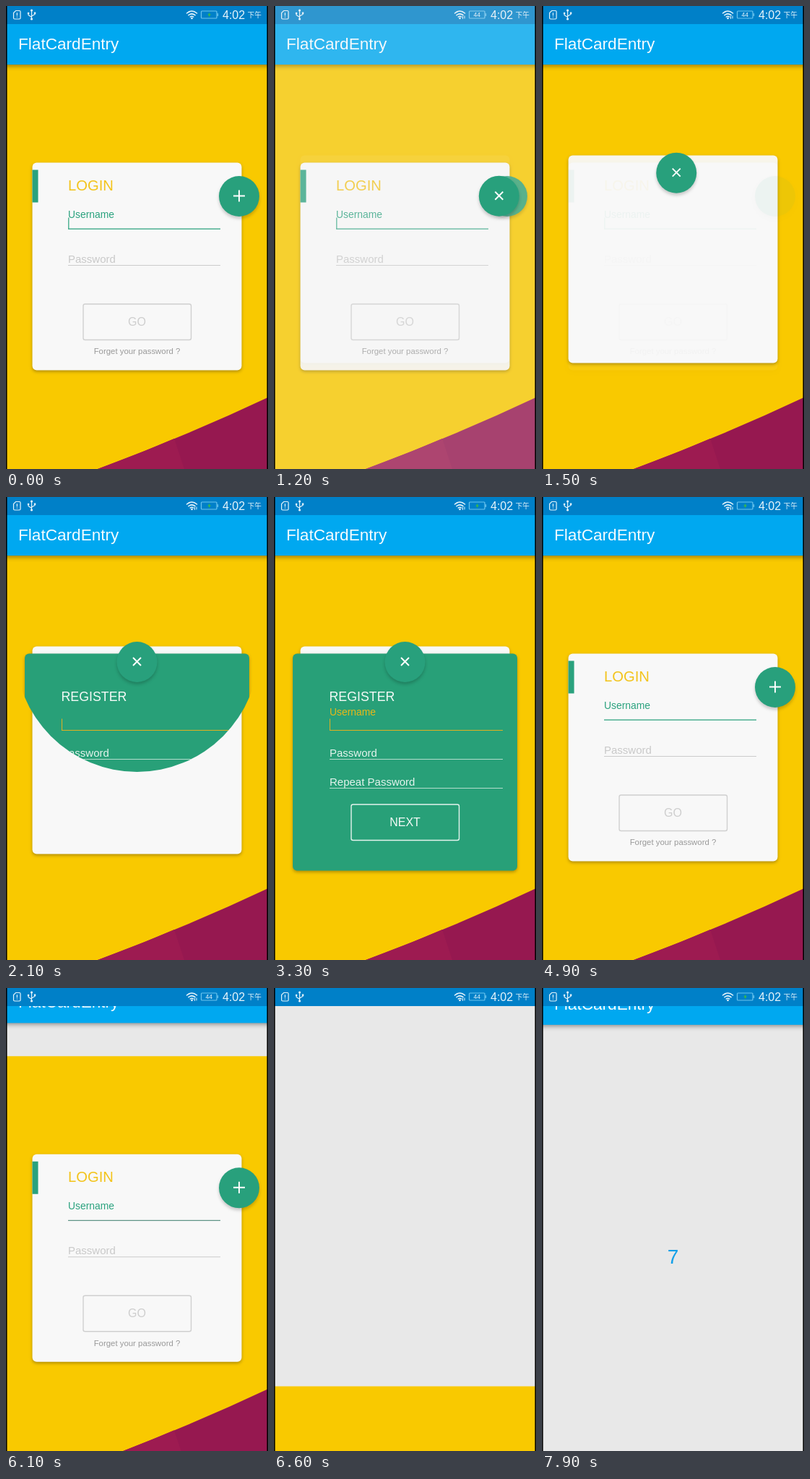
An HTML page that plays this animation: 363 px wide and 640 px high, repeating every 8000 ms.

```html
<!DOCTYPE html>
<html lang="en">
<head>
<meta charset="utf-8">
<title>Login card</title>
<style>
  html, body { margin: 0; width: 100%; height: 100%; overflow: hidden; background: #e8e8e8; }
  svg { display: block; width: 363px; height: 640px; }
  text { font-family: "Liberation Sans", Arial, sans-serif; white-space: pre; }
  .mid { text-anchor: middle; }
  .card { filter: drop-shadow(0 2px 2px rgba(70, 50, 0, .4)); }
  .fab { filter: drop-shadow(0 3px 2px rgba(0, 0, 0, .2)); }
  .bar { filter: drop-shadow(0 2px 3px rgba(0, 0, 0, .4)); }
</style>
</head>
<body>
<svg viewBox="0 0 363 640">
  <defs>
    <clipPath id="reveal"><circle id="hole" cx="181.5" cy="211" r="28"/></clipPath>
    <g id="paper">
      <rect y="81" width="363" height="640" fill="#f9c900"/>
      <path d="M92 653 L127 640 Q248 595 363 541 V721 H92Z" fill="#961850"/>
      <path d="M92 653 L127 640 Q182 620 233 598 L247 640 L270 721 H92Z" fill="#9d1b51"/>
    </g>
    <g id="disc"><circle r="28" fill="#28a07c"/></g>
  </defs>

  <rect width="363" height="640" fill="#e8e8e8"/>

  <g id="page">
    <use href="#paper"/>
    <rect class="card" x="36.5" y="216.5" width="290" height="287" rx="6" fill="#f8f8f8"/>
    <rect x="36.5" y="226.5" width="8" height="45" fill="#2aa27e"/>
    <text x="86" y="255.2" font-size="20.2" fill="#f3c41c">LOGIN</text>
    <text x="86" y="293" font-size="13.9" fill="#2aa27e">Username</text>
    <path id="focus" d="M86 308.2H297" stroke="#2aa27e" stroke-width="1.3"/>
    <path id="caret" d="M86.8 292.5V308" stroke="#2aa27e" stroke-width="1.2"/>
    <text x="86" y="355" font-size="15" fill="#c9c9c9">Password</text>
    <path d="M86 358.5H297" stroke="#cbcbcb"/>
    <rect x="107" y="412" width="149.5" height="49.5" rx="2.5" fill="none" stroke="#d0d0d0" stroke-width="1.4"/>
    <text class="mid" x="181.5" y="442" font-size="16" fill="#cecece">GO</text>
    <text class="mid" x="181.5" y="481.3" font-size="11.4" fill="#999">Forget your password ?</text>
    <g id="oldFab" class="fab" transform="translate(323 263)"><use href="#disc"/></g>
  </g>

  <g id="next">
    <use href="#paper"/>
    <rect class="card" x="36.5" y="206.5" width="290" height="287" rx="6" fill="#f8f8f8"/>
  </g>

  <text id="count" class="mid" x="181.5" font-size="28" fill="#14a0e8">7</text>

  <g id="header">
    <rect class="bar" x="-8" y="0" width="379" height="81" fill="#00a8f0"/>
    <text x="17" y="60" font-size="22.6" fill="#f4fbff">FlatCardEntry</text>
  </g>

  <g id="form" clip-path="url(#reveal)">
    <rect class="card" x="26" y="216.5" width="311" height="300" rx="6" fill="#28a078"/>
    <text x="76.5" y="282" font-size="17.8" fill="#f4faf7">REGISTER</text>
    <text id="hint" x="77" y="302" font-size="13.9" fill="#e8b818">Username</text>
    <path d="M77 322.5H317" stroke="#e0b020"/>
    <path id="caret2" d="M77.5 306.5V322" stroke="#e0b020"/>
    <g font-size="15" fill="#e4f3ed">
      <text x="77" y="358.5">Password</text>
      <text x="77" y="398.5">Repeat Password</text>
    </g>
    <path d="M77 362.5H317M77 402.5H317" stroke="#b4dccd"/>
    <rect x="107" y="425" width="149.5" height="49.5" rx="2.5" fill="none" stroke="#e4f3ed" stroke-width="1.4"/>
    <text class="mid" x="181.5" y="455" font-size="16" fill="#f4faf7">NEXT</text>
  </g>

  <g id="status">
    <rect width="363" height="25" fill="#0080c8"/>
    <g fill="none" stroke="#e8f4fb" stroke-width="1.2" stroke-linecap="round">
      <path d="M13.5 6.5H18.5Q20 6.5 20 8V16.5Q20 18 18.5 18H12Q10.5 18 10.5 16.5V9.5ZM15.3 9.5V13M15.3 15V15.2"/>
      <path d="M35.5 6V18M31 10.5V12.5L35.5 15.5M40 9.5V11.5L35.5 14"/>
      <path d="M250.5 10Q257.5 4 264.5 10M253 12.7Q257.5 9 262 12.7M255.3 15Q257.5 13.4 259.7 15" stroke-width="1.5"/>
      <path id="traffic" d="M261.5 17.5V14.5M264 14V17" stroke-width="1"/>
      <path d="M270.5 8Q270.5 7 271.5 7H291Q292 7 292 8V16Q292 17 291 17H271.5Q270.5 17 270.5 16ZM293.5 10.5V13.5" stroke="#6cc4ee"/>
    </g>
    <g fill="#e8f4fb">
      <circle cx="35.5" cy="6" r="1.6"/><circle cx="35.5" cy="18" r="1.6"/>
      <circle cx="31" cy="10" r="1.3"/><rect x="38.8" y="8.5" width="2.4" height="2.4"/>
      <circle cx="257.5" cy="17" r="1.3"/>
      <text x="300" y="17.5" font-size="16">4:02</text>
      <text x="334.5" y="16.3" font-size="9.7" style="font-family:'Noto Sans CJK SC','Noto Sans CJK',sans-serif">下午</text>
      <text id="level" class="mid" x="281.2" y="15.2" font-size="8.5">44</text>
    </g>
    <path id="bolt" d="M282.5 8.8L279.2 12.6H281.3L280.6 15.4L284 11.6H281.8Z" fill="#3fbf3a"/>
  </g>

  <rect id="veil" width="363" height="640" fill="#e8e8e8"/>

  <g id="fab" class="fab">
    <use href="#disc"/>
    <path id="plus" d="M-8 -.5H8M0 -8.5V7.5" stroke="#fff" stroke-width="1.9"/>
    <path id="cross" d="M-5.5 -6L5.5 5M5.5 -6L-5.5 5" stroke="#fff" stroke-width="1.9"/>
  </g>

  <path d="M.75 0V640M362.25 0V640" stroke="#000" stroke-width="1.5"/>
</svg>
<script>
const LOOP = 8000;
const el = {};
document.querySelectorAll('[id]').forEach(n => { el[n.id] = n; });

const clamp = v => Math.min(1, Math.max(0, v));
const part = (t, from, to) => clamp((t - from) / (to - from));
const within = (t, ...spans) => spans.some(([a, b]) => t >= a && t < b);
const show = (id, on) => { el[id].style.display = on ? '' : 'none'; };
const fade = (id, v) => { el[id].style.opacity = v; show(id, v > 0); };
const shift = (id, x, y) => el[id].setAttribute('transform', `translate(${x} ${y})`);

// cubic-bezier(.4, 0, .2, 1), solved by bisection
function ease(x) {
  let lo = 0, hi = 1;
  for (let i = 0; i < 24; i++) {
    const s = (lo + hi) / 2, r = 1 - s;
    if (1.2 * r * r * s + 0.6 * r * s * s + s ** 3 < x) lo = s; else hi = s;
  }
  return 3 * (1 - lo) * lo * lo + lo ** 3;
}

// Arc between the card's corner (0) and its top centre (1)
function fabAt(u) {
  const r = 1 - u;
  const mix = (a, b, c) => r * r * a + 2 * r * u * b + u * u * c;
  return [mix(323, 240, 181.5), mix(263, 262, 228)];
}

function draw(t) {
  // explode: the old screen speeds up and leaves, the new one slows into place
  const leave = (Math.max(0, t - 6000) / 100) ** 2;
  const drop = 13 * leave;
  const left = 8400 - t;
  const entering = t >= 6700;
  const lift = entering ? (left * 0.011) ** 2 : 32 * leave;
  shift('page', 0, drop);
  show('page', !entering);
  shift('header', 0, -lift);
  show('header', lift < 64);
  show('count', entering);
  el.count.setAttribute('y', 370.5 + (left * 0.0065) ** 2);

  // screen changes
  fade('next', t < 3000 ? part(t, 1180, 1520) : 1 - part(t, 4430, 4700));
  fade('veil', t < 1200 ? 0.2 * part(t, 1100, 1200) : 0.2 * (1 - part(t, 1280, 1500)));
  show('oldFab', within(t, [1100, 1600]));

  // round reveal of the form
  const open = t < 3000 ? part(t, 1750, 2250) ** 2 : 1 - part(t, 3850, 4350) ** 2;
  show('form', within(t, [1750, 4350]));
  el.hole.setAttribute('r', open < 1 ? 28 + 286 * open : 400);
  fade('hint', part(t, 2250, 2400));

  // round button
  const u = t < 3000 ? ease(part(t, 1125, 1625)) : 1 - ease(part(t, 4420, 4880));
  const [x, y] = fabAt(u);
  shift('fab', x, y + drop);
  show('fab', !entering);
  const crossed = within(t, [1100, 4350]);
  show('cross', crossed);
  show('plus', !crossed);

  // focus and blinking carets
  show('caret', within(t, [0, 500], [1000, 1600], [5300, 5800]));
  show('caret2', Math.floor(t / 500) % 2 === 0);
  el.focus.setAttribute('stroke', t < 6000 ? '#2aa27e' : '#5f9486');

  // status icons
  const level = within(t, [1000, 1900], [6000, 6900]);
  show('level', level);
  show('bolt', !level);
  show('traffic', within(t, [800, 4000], [4600, 6900]));
}

const start = performance.now();
function tick() {
  draw((performance.now() - start) % LOOP);
  requestAnimationFrame(tick);
}
tick();
</script>
</body>
</html>
```
